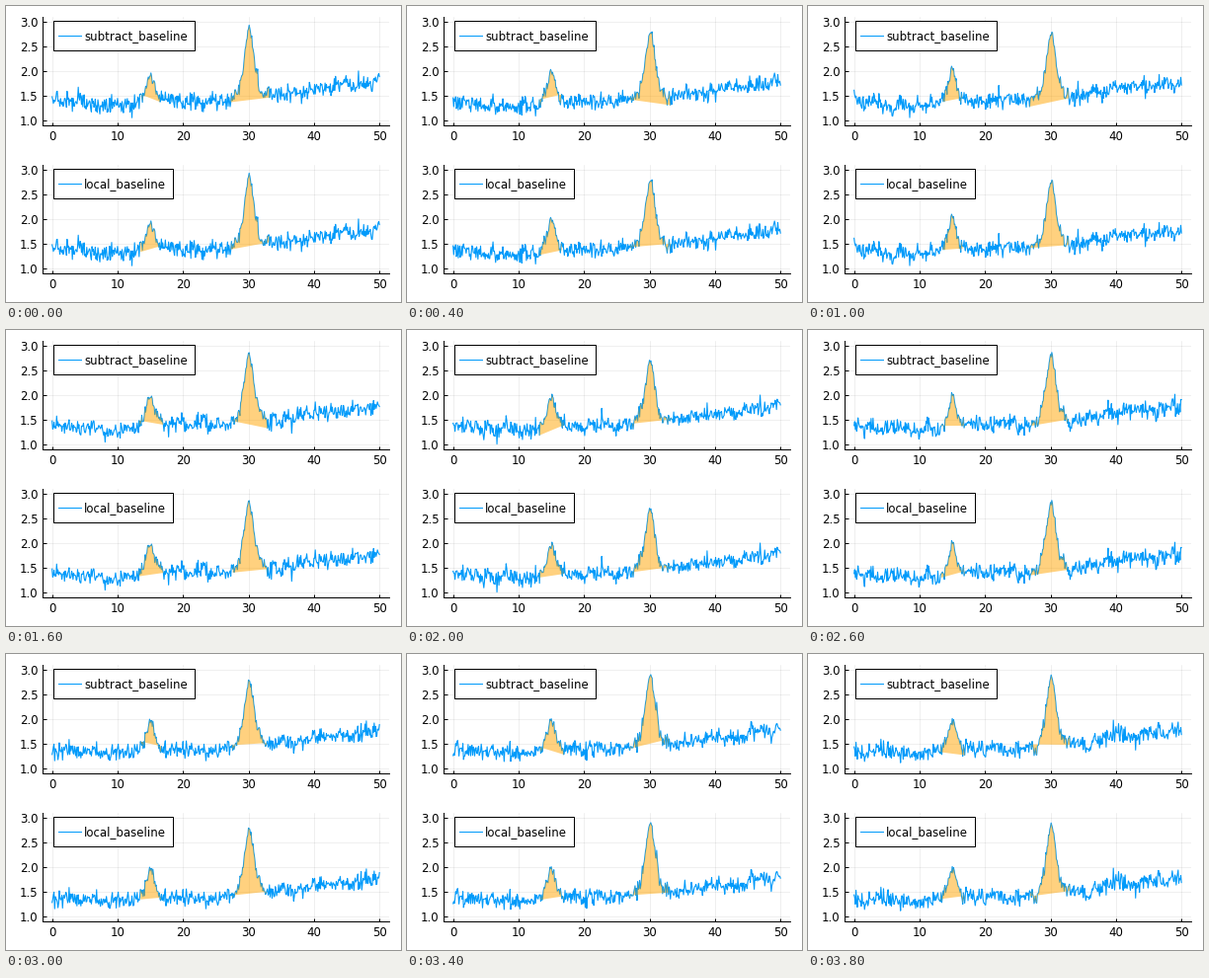
Animation of 400x300 px, one loop 4 s. Source, as a matplotlib script:

```python
import numpy as np
import matplotlib.pyplot as plt
from matplotlib.animation import FuncAnimation
from matplotlib.lines import Line2D
from matplotlib.patches import Rectangle
from matplotlib.transforms import IdentityTransform

W, H, DPI = 400, 300, 100
FRAMES, INTERVAL = 20, 200
PX = 72 / DPI
BLUE = "#009AFA"
FONT = dict(family="DejaVu Sans", size=11.8 * PX)

x = np.linspace(0, 50, 501)
trend = 1.34 + 4e-6 * x**3 + 0.04 * np.cos(np.pi * x / 10)

# Center, width, top, and reach of the window to the left and right
PEAKS = [(15, 0.55, 2.03, 1.7, 1.8), (30.1, 0.68, 2.79, 2.9, 2.9)]


def measure(i):
    """Noisy signal plus the index window of each peak."""
    rng = np.random.default_rng(100 + i)
    drift = np.convolve(rng.normal(0, 1, x.size + 8), np.ones(9) / 3, "valid")
    noise = rng.normal(0, 0.085, x.size) + 0.035 * drift
    y, spans = trend.copy(), []
    for center, width, top, before, after in PEAKS:
        bell = 1 / np.cosh((x - center) / width)
        y += bell * (rng.normal(top, 0.05) - 1.4)
        noise *= 1 - 0.5 * bell
        edges = center + np.array([-before, after]) + rng.uniform(-0.4, 0.4, 2)
        spans.append(np.rint(edges * 10).astype(int))
    return y + noise, spans


def region(y, left, right, a, b):
    """Outline between the curve and the straight baseline a-b."""
    xs, ys = x[left:right + 1], y[left:right + 1]
    return np.column_stack([np.r_[xs, xs[-1], xs[0]], np.r_[ys, b, a]])


def add_legend(ax, top, width, label):
    px = dict(transform=IdentityTransform(), clip_on=False)
    y = H - top
    ax.add_patch(Rectangle((48, y - 30), width, 30, fc="white", ec="black",
                           lw=PX, zorder=5, **px))
    ax.add_line(Line2D([53, 76], [y - 15, y - 15], color=BLUE, lw=PX,
                       zorder=6, **px))
    ax.text(79, y - 19, label, va="baseline", zorder=6, **FONT, **px)


def add_panel(top, label, width):
    ax = fig.add_axes([36.7 / W, 1 - (top + 110) / H, 351.4 / W, 110 / H])
    ax.set(xlim=(-1.5, 51.5), ylim=(0.9, 3.1),
           xticks=range(0, 51, 10), yticks=np.arange(1, 3.1, 0.5))
    ax.spines[["top", "right"]].set_visible(False)
    ax.spines[["left", "bottom"]].set_linewidth(PX)
    ax.set_axisbelow(True)
    ax.grid(color="black", alpha=0.1, lw=0.6 * PX)
    ax.tick_params(direction="in", length=3.5 * PX, width=PX)
    ax.tick_params(axis="x", pad=5 * PX)
    ax.tick_params(axis="y", pad=4 * PX)
    for text in ax.get_xticklabels() + ax.get_yticklabels():
        text.set(**FONT)
    curve, = ax.plot([], [], color=BLUE, lw=1.1 * PX, zorder=2)
    fills = [ax.fill([0, 0, 0], [1, 1, 1], fc="orange", alpha=0.5, lw=0,
                     zorder=3)[0] for _ in PEAKS]
    add_legend(ax, top + 3.7, width, label)
    return curve, fills


fig = plt.figure(figsize=(W / DPI, H / DPI), dpi=DPI, facecolor="white")
panels = [add_panel(11.3, "subtract_baseline", 142.5),
          add_panel(161.3, "local_baseline", 120.5)]


def update(i):
    y, spans = measure(i)
    for curve, _ in panels:
        curve.set_data(x, y)
    (_, direct), (_, local) = panels
    for k, (left, right) in enumerate(spans):
        direct[k].set_xy(region(y, left, right, y[left], y[right]))
        # The local baseline averages the samples just outside the window
        a, b = y[left - 20:left].mean(), y[right:right + 20].mean()
        local[k].set_xy(region(y, left, right, a, b))
    return [curve for curve, _ in panels] + direct + local


anim = FuncAnimation(fig, update, frames=FRAMES, interval=INTERVAL,
                     init_func=lambda: update(0), repeat=True, repeat_delay=0)
plt.show()
```
